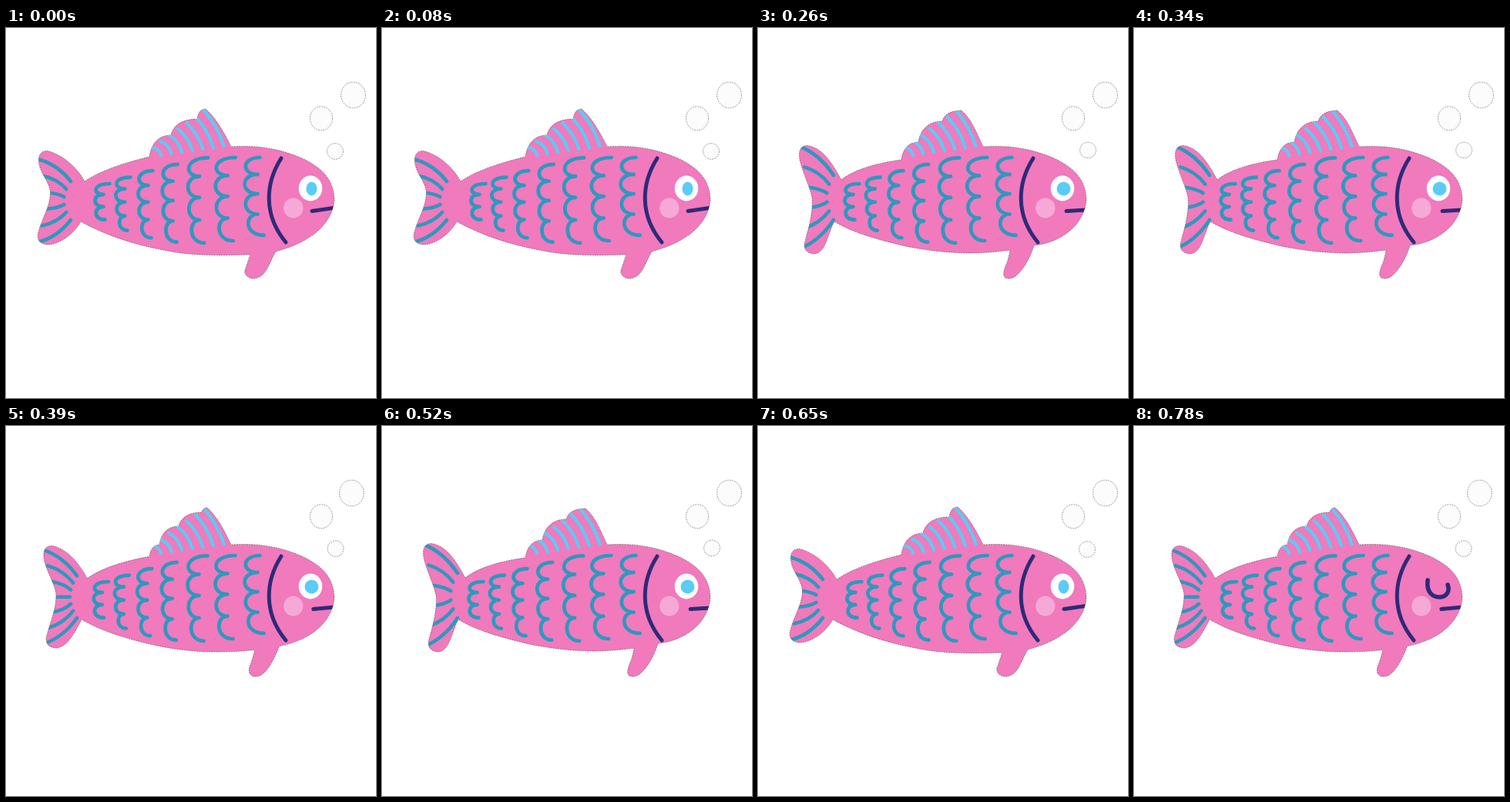
Recreate the animation shown at these times as an HTML page. Size 480 by 480 pixels, loop 0.91 s.

```html
<!DOCTYPE html>
<html lang="en">
<head>
<meta charset="utf-8">
<title>Swimming fish</title>
<style>
  html, body { margin: 0; width: 100%; height: 100%; overflow: hidden; background: #fff; }
  svg { display: block; width: 100vw; height: 100vh; }
  .line { fill: none; stroke-linecap: round; stroke-linejoin: round; }
  .edge { stroke: #333; stroke-opacity: .7; stroke-width: .7; stroke-dasharray: 2 1.2; }
</style>
</head>
<body>
<svg id="stage" viewBox="0 0 480 480"></svg>
<script>
const STEP = 130;
const PINK = '#f07abc', TEAL = '#2e98be', SKY = '#5accf5', NAVY = '#2e2a78', BLUSH = '#f6a9d6';

// sway drives the whole body; crest holds the points where the back fin's lobes meet.
const low = { sway: -1, stripes: 6, pupil: 7, crest: [[214, 139], [248, 118], [259, 105]] };
const mid = { sway: .15, stripes: 7, pupil: 9, crest: [[199, 154], [224, 130], [254, 112], [261, 106]] };
const high = { sway: 1, stripes: 6, pupil: 9, crest: [[208, 148], [239, 121], [264, 107]] };
const cycle = [low, mid, high, mid, high, low, mid];
const BLINK = cycle.length - 1;

const NS = 'http://www.w3.org/2000/svg';
const stage = document.getElementById('stage');

function set(el, attrs) {
  for (const k in attrs) el.setAttribute(k, attrs[k]);
  return el;
}
const add = (tag, attrs, parent = stage) =>
  parent.appendChild(set(document.createElementNS(NS, tag), attrs));
const line = (stroke, width, parent) =>
  add('path', { class: 'line', stroke, 'stroke-width': width }, parent);
const oval = (fill, cx, cy, rx, ry, cls = '') =>
  add('ellipse', { fill, cx, cy, rx, ry, class: cls });
const times = (n, fn) => Array.from({ length: n }, (_, i) => fn(i)).join('');

// Curve between two points, bent by an offset from their middle.
const bend = (x1, y1, x2, y2, dx, dy) =>
  `M${x1} ${y1}Q${(x1 + x2) / 2 + dx} ${(y1 + y2) / 2 + dy} ${x2} ${y2}`;

function crestPath(x, y, points) {
  return points.map(([qx, qy]) => {
    const dx = qx - x, dy = qy - y;
    const d = `C${x + dx * .1} ${y + dy * .7} ${x + dx * .5} ${qy} ${qx} ${qy}`;
    [x, y] = [qx, qy];
    return d;
  }).join('');
}

function bodyPath({ sway: s, crest }) {
  const root = [105 + 3 * s, 198 - s], heel = [98 + s, 251];
  const [fx, fy] = [64 + 6.5 * s, 219 + 5 * s];
  const [ux, uy] = [48 + 5.5 * s, 168 - 3.5 * s];
  const [lx, ly] = [52 + 9.5 * s, 269 + 6 * s];
  const back = [186, 169 + 2 * s];
  const [tx, ty] = crest[crest.length - 1];
  return `M${root}C124 184 154 175 ${back}${crestPath(...back, crest)}
    C${tx + 13} ${ty + 11} 284 137 292 154
    C322 152 352 155 384 169C412 182 425 198 426 222
    C424 256 392 279 ${354 + 4 * s} ${286 - 4 * s}
    C${347 + 5 * s} 303 338 322 ${327 + 2.5 * s} 324.5
    C317 327 ${311 + 5 * s} 320 ${317 + 6 * s} ${308 - 3.5 * s}
    Q${320 + 5 * s} 299 ${322 + 5 * s} ${291 - 3 * s}
    C278 295 240 ${294 - 2 * s} ${200 - 4 * s} ${286 - 2 * s}
    C165 ${279 - 2 * s} 125 267 ${heel}
    C${heel[0] - 9} ${heel[1] + 17} ${lx + 26} ${ly + 18} ${lx + 11} ${ly + 18}
    C${lx - 1} ${ly + 17} ${lx - 3} ${ly + 9} ${lx} ${ly}
    C${lx + 5} ${ly - 18} ${fx} ${fy + 17} ${fx} ${fy}
    C${fx} ${fy - 14} ${ux} ${uy + 16} ${ux} ${uy}
    C${ux} ${uy - 13} ${ux + 10} ${uy - 14} ${ux + 18} ${uy - 10}
    C${ux + 34} ${uy - 4} ${root[0] - 9} ${root[1] - 17} ${root}Z`;
}

function tailPath({ sway: s, stripes }) {
  const x = 62 + 7 * s, y = 222 - 2 * s;
  return times(stripes, i => {
    const v = 2 * i / (stripes - 1) - 1;
    return bend(x - 14 * Math.abs(v), y + v * (60 + 6 * s),
                x + 20 + 9 * v * v, y + v * (27 + 2 * s), 4, 8 * v);
  });
}

const finPath = () => times(7, i =>
  bend(189 + 11.3 * i, 155 - 8 * i, 201 + 13.6 * i, 165 - 2 * i, 4, -4));

// One column of bumps, growing taller downwards, with longer hooks mid-body.
function column(i, s) {
  const left = 114 + 26 * i + 1.1 * i * i - 1.5 * s * (1 - i / 6);
  const top = Math.max(168, 202 - 8.4 * i);
  const bottom = 279 - 2.1 * (i - 3.8) ** 2;
  const bumps = i ? 4 : 3;
  const hook = left + 19 + 9 * Math.exp(-((i - 4.5) ** 2));
  const cuspY = k => top + (bottom - top) * (k / bumps) ** 1.1;
  let x = hook, d = `M${x} ${top}`;
  for (let k = 0; k < bumps; k++) {
    const end = left + (k === bumps - 1 ? 13 + 2 * i : 11 + i);
    const edge = left + 1.2 * (k - 1) ** 2;
    const c = (edge - (x + end) / 8) / .75;
    d += `C${c} ${cuspY(k)} ${c} ${cuspY(k + 1)} ${end} ${cuspY(k + 1)}`;
    x = end;
  }
  return d;
}

const clip = add('path', {}, add('clipPath', { id: 'skin' }, add('defs', {})));
const body = add('path', { fill: PINK, class: 'edge' });
const inside = add('g', { 'clip-path': 'url(#skin)' });
const tail = line(TEAL, 4.6, inside);
set(line(SKY, 4.2, inside), { d: finPath() });
const scales = line(TEAL, 4.7, inside);
const mouth = line(NAVY, 5, inside);
set(line(NAVY, 5), { d: 'M357 169C336 202 334 243 363 278' });
oval(BLUSH, 372.8, 233.5, 12.6, 13);
const eye = oval('#fff', 395, 208, 15.3, 16.4);
const iris = oval(SKY, 396.5, 208.5, 9, 9);
const lid = set(line(NAVY, 5.6), { d: 'M381 200C379 215 387 222 396 222C406 222 410 214 407 206' });
const bubbles = [
  oval('#fcfcfc', 449, 87, 15.9, 16.8, 'edge'),
  oval('#fcfcfc', 409, 117.3, 14.5, 15.5, 'edge'),
  oval('#fcfcfc', 427.5, 159.2, 10.4, 10.3, 'edge')
];

function draw(time) {
  const i = Math.floor(time / STEP) % cycle.length;
  const pose = cycle[i], s = pose.sway;
  const d = bodyPath(pose);
  set(clip, { d });
  set(body, { d });
  set(tail, { d: tailPath(pose) });
  set(scales, { d: times(7, n => column(n, s)) });
  set(mouth, { d: `M${398.5 + 1.5 * s} 237.5L428 ${234.5 + 1.5 * s}` });
  set(iris, { rx: pose.pupil });
  eye.style.display = iris.style.display = i === BLINK ? 'none' : '';
  lid.style.display = i === BLINK ? '' : 'none';
  set(bubbles[0], { cx: 448 + 2.5 * Math.abs(s) });
  set(bubbles[2], { cx: 427.5 + .5 * s, cy: 159.2 - .8 * s });
}

const start = performance.now();
function tick() {
  draw(performance.now() - start);
  requestAnimationFrame(tick);
}
tick();
</script>
</body>
</html>
```
